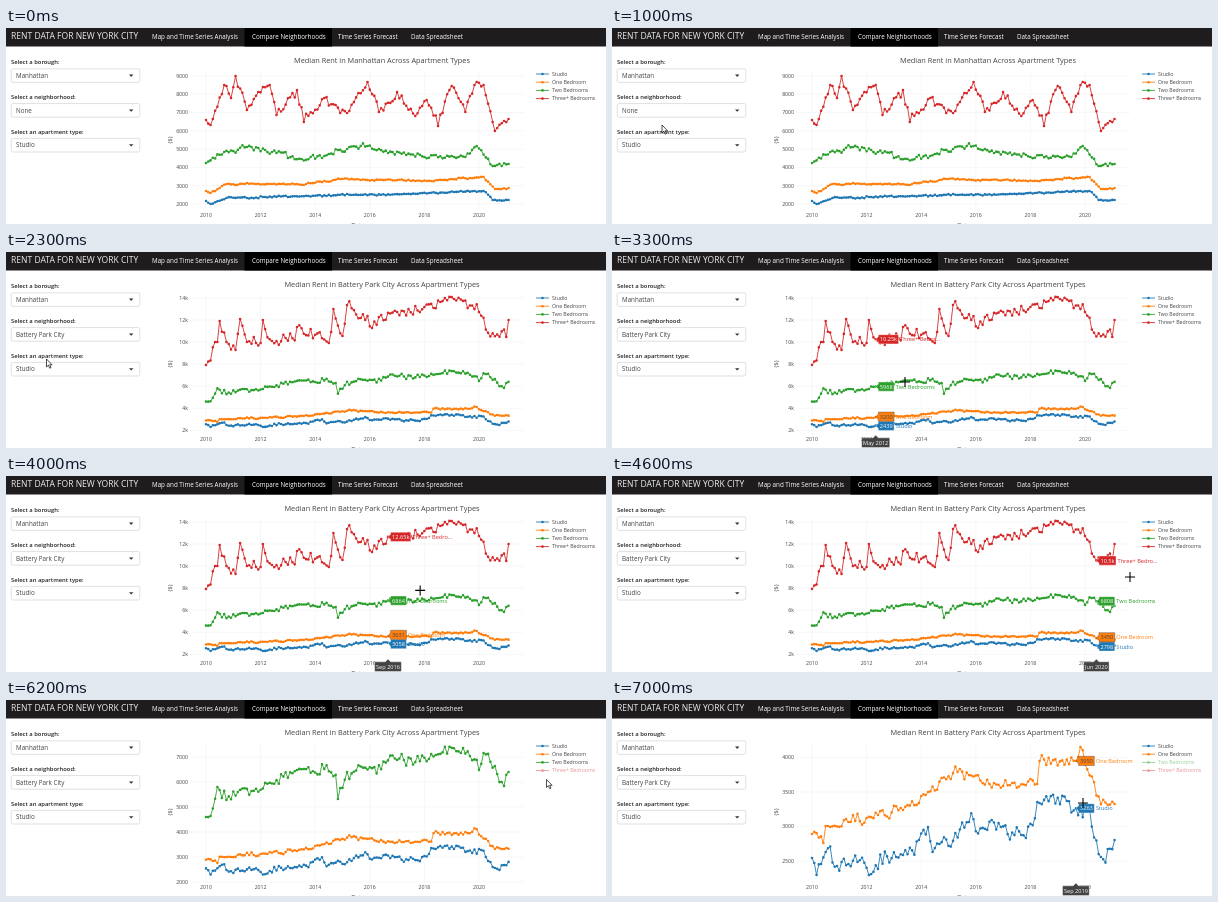
Animation, 600 px wide and 196 px high, one loop 7200 ms. Source, as an HTML page:

```html
<!DOCTYPE html>
<html lang="en">
<head>
<meta charset="utf-8">
<title>Rent data</title>
<style>
  html, body { margin: 0; width: 100%; height: 100%; overflow: hidden; background: #fff; }
  svg { display: block; width: 100vw; height: 100vh; }
  text { font-family: "Open Sans", sans-serif; fill: #444; white-space: pre; }
</style>
</head>
<body>
<svg id="stage" viewBox="0 0 600 196"></svg>
<script>
const stage = document.getElementById('stage');
const LOOP = 7200, STEP = 100, LAG = 190;
const X0 = 200, MONTH = 2.275, COUNT = 134;
const PLOT = { left: 185, right: 518, top: 42, bottom: 183 };
const NAMES = ['Studio', 'One Bedroom', 'Two Bedrooms', 'Three+ Bedrooms'];
const COLORS = ['#1f77b4', '#ff7f0e', '#2ca02c', '#d62728'];
const MONTHS = ['Jan', 'Feb', 'Mar', 'Apr', 'May', 'Jun', 'Jul', 'Aug', 'Sep', 'Oct', 'Nov', 'Dec'];

function add(parent, tag, attrs = {}) {
  const el = document.createElementNS('http://www.w3.org/2000/svg', tag);
  for (const key in attrs) el.setAttribute(key, attrs[key]);
  return parent.appendChild(el);
}

// Text placed by its vertical centre.
function label(parent, str, x, mid, size, attrs = {}) {
  const el = add(parent, 'text', { x, y: mid + size * 0.36, 'font-size': size, ...attrs });
  el.textContent = str;
  return el;
}

// Vertical scales: `y` is the position of `base`, `k` the pixels per dollar.
const scale = (base, y, k) => ({ y: v => y - (v - base) * k, v: p => base + (y - p) / k });
const WIDE = scale(2000, 176, 0.0183);
const ALL = scale(2000, 178.3, 0.01103);
const THREE = scale(2000, 182, 0.025);
const TWO = scale(4000, 57.5, 0.069);

const xAt = m => X0 + m * MONTH;
const monthAt = x => Math.max(0, Math.min(COUNT - 1, Math.round((x - X0) / MONTH)));

function noise(n) {
  const s = Math.sin(n * 12.9898) * 43758.5453;
  return (s - Math.floor(s)) * 2 - 1;
}

// Monthly values through a few turning points, with seeded jitter in between.
function series(axis, jitter, pts) {
  const out = [], seed = pts.length * 211;
  for (let i = 0; i + 3 < pts.length; i += 2) {
    const a = monthAt(pts[i]), b = monthAt(pts[i + 2]);
    for (let m = a; m <= b; m++) {
      const f = (m - a) / (b - a);
      const wobble = 0.6 * noise(m + seed) + 0.6 * noise(Math.floor(m / 3) + seed * 3);
      const y = pts[i + 1] + (pts[i + 3] - pts[i + 1]) * f;
      out[m] = axis.v(y + (m > a && m < b ? wobble * jitter : 0));
    }
  }
  return out;
}

const cityStudio = series(WIDE, 1, [200,173, 205,176, 220,170, 345,167, 400,166, 478,163, 486,172, 503,172]);
const cityOne = series(WIDE, 1, [200,163, 205,165, 220,156, 300,156, 335,151, 420,153, 478,149, 490,161, 503,160]);
const cityTwo = series(WIDE, 3.5, [200,135, 218,124, 246,119, 296,131, 340,121, 362,118, 400,127, 460,129, 471,118, 486,138, 503,136]);
const cityThree = series(WIDE, 5, [200,92, 205,97, 219,57, 226,70, 230,48, 240,82, 252,64, 264,57, 270,87,
  292,62, 298,94, 318,70, 340,85, 361,54, 372,84, 390,64, 409,88, 421,72, 433,98, 446,58, 460,84,
  471,54, 477,57, 489,103, 503,91]);

const parkStudio = series(TWO, 11, [200,158, 204,175, 214,152, 224,166, 263.7,165.21, 290,155, 316,127,
  321,152, 358,122, 414,138, 426,102, 464,108.353, 475,107, 484.4,140.44, 490,157, 503,140]);
const parkOne = series(TWO, 7, [200,134, 211,143, 214,126, 238,122, 263.7,112.7, 290,110, 316,92,
  346,72, 392,86, 425,84, 428,61, 464,60.95, 468,47, 484.4,95.45, 503,104]);
const parkTwo = series(THREE, 7, [200,117, 205,116, 211,87, 217,98, 245,91, 263.7,82.8, 291,70,
  331,74, 333,99, 341,72, 398,60, 457,48, 473,70, 478,53, 484.4,61.8, 496,82, 503,72]);
const parkThree = series(ALL, 7, [200,113, 212,90, 214,69, 220,90, 229,98, 234,67, 240,90, 255,91,
  257,68, 263.7,87.3, 290,90, 292,75, 322,91, 328,57, 336,84, 342,53, 365,76, 392,60, 447,47,
  473,60, 484.4,84.55, 500,85, 503,68]);

const city = [cityStudio, cityOne, cityTwo, cityThree];
const park = [parkStudio, parkOne, parkTwo, parkThree];

const range = (from, to, by) => Array.from({ length: (to - from) / by + 1 }, (_, i) => from + i * by);
const inK = v => v / 1000 + 'k';
const VIEWS = [
  { at: 0, place: 'Manhattan', data: city, axis: WIDE, shown: 4, ticks: range(2000, 9000, 1000), tick: String },
  { at: 2100, place: 'Battery Park City', data: park, axis: ALL, shown: 4, ticks: range(2000, 14000, 2000), tick: inK },
  { at: 5800, place: 'Battery Park City', data: park, axis: THREE, shown: 3, ticks: range(2000, 7000, 1000), tick: String },
  { at: 6600, place: 'Battery Park City', data: park, axis: TWO, shown: 2, ticks: range(2500, 4000, 500), tick: String }
];

// Page frame
add(stage, 'rect', { width: 600, height: 196, fill: '#fff' });
add(stage, 'rect', { width: 600, height: 18.5, fill: '#1f1c1d' });
add(stage, 'rect', { x: 238.5, width: 87.5, height: 18.5, fill: '#000' });
label(stage, 'RENT DATA FOR NEW YORK CITY', 5, 8.2, 8.55, { style: 'fill:#eee' });
[['Map and Time Series Analysis', 146], ['Compare Neighborhoods', 246],
 ['Time Series Forecast', 332], ['Data Spreadsheet', 405]]
  .forEach(([str, x]) => label(stage, str, x, 9, 6.25, { style: 'fill:#fff' }));

function selectBox(title, value, mid) {
  label(stage, title, 5, mid - 13.4, 5.85, { 'font-weight': 600, style: 'fill:#222' });
  add(stage, 'rect', { x: 5.2, y: mid - 6.8, width: 128.6, height: 13.6, rx: 1.8,
    fill: '#fff', stroke: '#ccc', 'stroke-width': 0.6 });
  add(stage, 'path', { d: `M123 ${mid - 1}h4.4l-2.2 2.4z`, fill: '#333' });
  return label(stage, value, 10, mid, 6.25);
}
selectBox('Select a borough:', 'Manhattan', 47.6);
const hood = selectBox('Select a neighborhood:', 'None', 82.4);
selectBox('Select an apartment type:', 'Studio', 117.2);

function drawChart(view) {
  const g = add(stage, 'g');
  const middle = { 'text-anchor': 'middle' };
  label(g, `Median Rent in ${view.place} Across Apartment Types`, 376, 32, 7.35, middle);
  label(g, '($)', 0, 0, 6.05, { ...middle, transform: 'translate(164 112) rotate(-90)' });
  label(g, 'Date', 352, 197, 6.05, middle);

  let grid = '';
  for (const v of view.ticks) {
    const y = view.axis.y(v);
    grid += `M${PLOT.left} ${y}H${PLOT.right}`;
    label(g, view.tick(v), 182, y, 5.2, { 'text-anchor': 'end' });
  }
  for (let year = 2010; year <= 2020; year += 2) {
    const x = xAt((year - 2010) * 12);
    grid += `M${x} ${PLOT.top}V${PLOT.bottom}`;
    label(g, year, x, 187.5, 5.2, middle);
  }
  add(g, 'path', { d: grid, stroke: '#eee', 'stroke-width': 0.5 });

  NAMES.forEach((name, i) => {
    const stroke = COLORS[i], ly = 46 + i * 8.2;
    const dots = { stroke, 'stroke-width': 2.6, 'stroke-linecap': 'round' };
    const key = add(g, 'g', { opacity: i < view.shown ? 1 : 0.5 });
    add(key, 'path', { d: `M530 ${ly}h13`, stroke, 'stroke-width': 0.87 });
    add(key, 'path', { d: `M536.5 ${ly}h0`, ...dots });
    label(key, name, 546, ly, 5.2, i < view.shown ? {} : { style: 'fill:' + stroke });
    if (i >= view.shown) return;
    const pts = view.data[i].map((v, m) => `${xAt(m).toFixed(2)} ${view.axis.y(v).toFixed(2)}`);
    add(g, 'path', { d: 'M' + pts.join('L'), fill: 'none', stroke, 'stroke-width': 0.87, 'stroke-linejoin': 'round' });
    add(g, 'path', { d: pts.map(p => `M${p}h0`).join(''), ...dots });
  });
  return g;
}
VIEWS.forEach(view => { view.el = drawChart(view); });

const tips = add(stage, 'g');
const arrow = add(stage, 'path', { d: 'M0 0V8L1.9 6.2 3.2 9.2 4.5 8.6 3.2 5.8H5.6Z',
  fill: '#fff', stroke: '#000', 'stroke-width': 0.7 });
const cross = add(stage, 'path', { d: 'M-5 0H5M0-5V5', stroke: '#000', 'stroke-width': 1.1 });

const money = v => v >= 9999.5 ? +(v / 1000).toFixed(2) + 'k' : Math.round(v);

function drawTips(view, m) {
  const x = xAt(m), h = 9.2;
  const rows = view.data.slice(0, view.shown).map((s, i) => ({ i, v: s[m], y: view.axis.y(s[m]) }));
  rows.forEach(r => { r.mid = r.y; });
  for (let i = 1; i < rows.length; i++) {
    const push = (h - (rows[i - 1].mid - rows[i].mid)) / 2;
    if (push > 0) { rows[i - 1].mid += push; rows[i].mid -= push; }
  }
  for (const { i, v, y, mid } of rows) {
    const ink = i === 1 ? '#444' : '#fff', left = x + 2.6;
    const box = add(tips, 'path', { fill: COLORS[i], stroke: ink, 'stroke-width': 0.4 });
    const w = label(tips, money(v), left + 1.5, mid, 5.6, { style: 'fill:' + ink }).getComputedTextLength() + 3;
    box.setAttribute('d', `M${x} ${y}L${left} ${mid - 2.6}V${mid - h / 2}h${w}v${h}H${left}V${mid + 2.6}Z`);
    const name = NAMES[i].length > 14 ? NAMES[i].slice(0, 12) + '...' : NAMES[i];
    label(tips, name, left + w + 1.6, mid, 5.6, { style: 'fill:' + COLORS[i] });
  }
  const box = add(tips, 'path', { fill: '#444', stroke: '#fff', 'stroke-width': 0.4 });
  const date = label(tips, `${MONTHS[m % 12]} ${2010 + Math.floor(m / 12)}`, x, 190.7, 5.6,
    { 'text-anchor': 'middle', style: 'fill:#fff' });
  const half = date.getComputedTextLength() / 2 + 1.4;
  box.setAttribute('d', `M${x} 183l2.6 2.8H${x + half}V195.6H${x - half}V185.8H${x - 2.6}Z`);
}

// Pointer path: time, x, y
const PATH = [
  [400, 150, 60], [1000, 50, 97], [1300, 62, 82], [1500, 62, 82], [1900, 42, 108],
  [2300, 40.5, 107], [3110, 264, 128], [3300, 293, 130], [4600, 518, 101], [5200, 560, 68],
  [5700, 560, 69], [6200, 540.5, 79.5], [6400, 556, 61], [6550, 556, 61],
  [6810, 464, 101], [7000, 471, 103]
];

function pointer(t) {
  const n = PATH.findIndex(p => p[0] > t);
  if (n < 1) return PATH[n ? PATH.length - 1 : 0].slice(1);
  const [ta, xa, ya] = PATH[n - 1], [tb, xb, yb] = PATH[n], f = (t - ta) / (tb - ta);
  return [xa + (xb - xa) * f, ya + (yb - ya) * f];
}

const inPlot = ([x, y]) => x >= PLOT.left && x <= PLOT.right && y >= PLOT.top && y <= PLOT.bottom;
const show = (el, on) => el.setAttribute('visibility', on ? 'visible' : 'hidden');

function render(t) {
  const view = VIEWS.filter(v => v.at <= t).pop();
  VIEWS.forEach(v => show(v.el, v === view));
  hood.textContent = t < 2000 ? 'None' : 'Battery Park City';

  const pos = pointer(t), over = inPlot(pos), visible = t >= PATH[0][0];
  for (const el of [arrow, cross]) el.setAttribute('transform', `translate(${pos})`);
  show(arrow, visible && !over);
  show(cross, visible && over);

  // Hover labels trail the pointer.
  tips.replaceChildren();
  const late = pointer(Math.min(t, 7000) - LAG);
  if (t > 2300 && inPlot(late)) drawTips(view, monthAt(late[0]));
}

let last = -1;
const start = performance.now();
function tick() {
  const t = Math.floor(((performance.now() - start) % LOOP) / STEP) * STEP;
  if (t !== last) render(last = t);
  requestAnimationFrame(tick);
}
tick();
</script>
</body>
</html>
```
